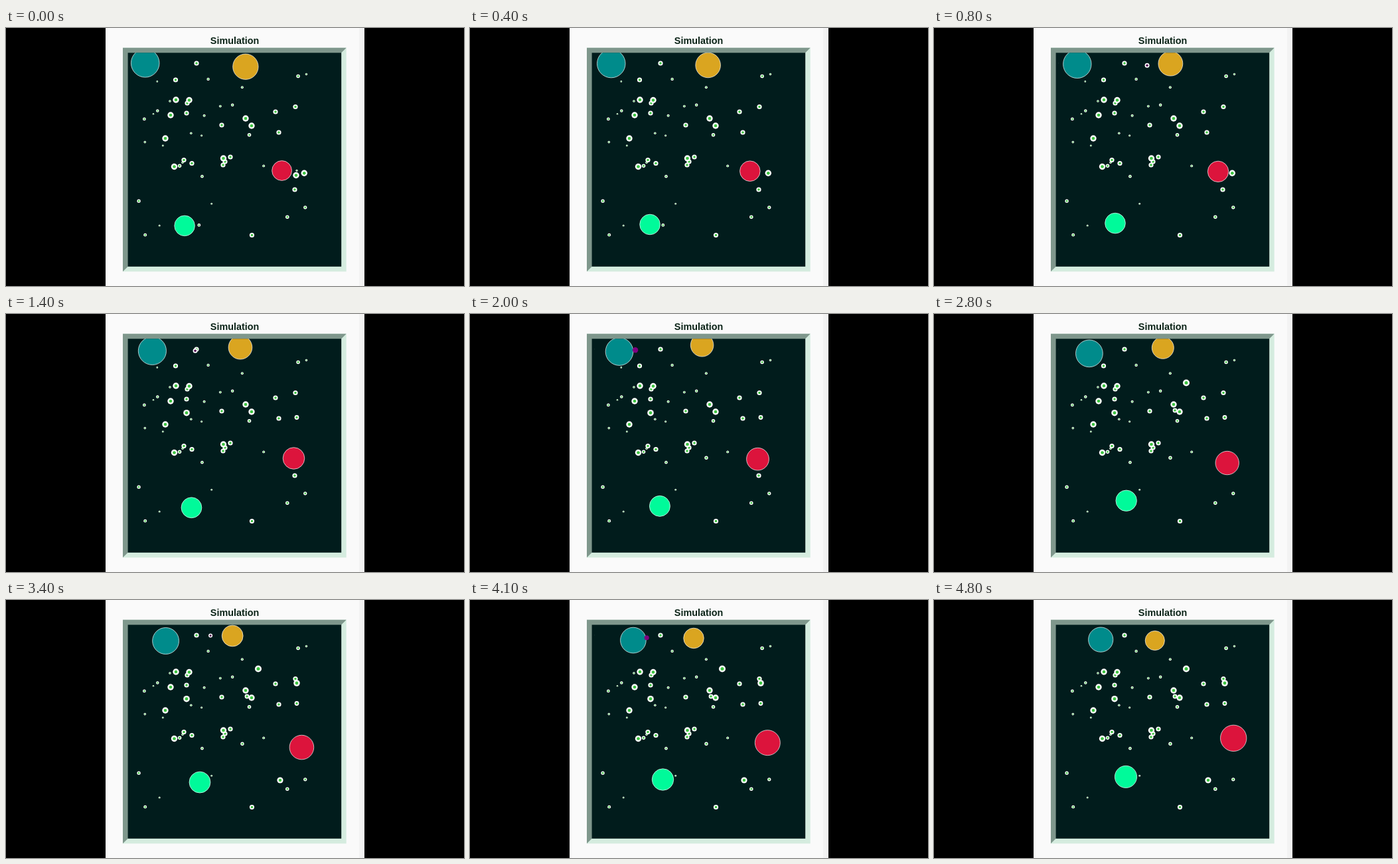
An HTML page for the animation above (4.9 s loop, 690 px wide and 388 px high).

```html
<!DOCTYPE html>
<html lang="en">
<head>
<meta charset="utf-8">
<title>Simulation</title>
<style>
  html, body { margin: 0; width: 100%; height: 100%; overflow: hidden; background: #000; }
  svg { display: block; width: 690px; height: 388px; }
  text { font: bold 14.4px "Liberation Sans", Arial, sans-serif; fill: #0c2418; }
</style>
</head>
<body>
<svg viewBox="0 0 690 388">
  <rect width="690" height="388" fill="#000"/>
  <rect x="150" width="390" height="388" fill="#fafafa"/>
  <rect x="532" width="8" height="388" fill="#f3f3f3"/>
  <text x="344.6" y="23.6" text-anchor="middle">Simulation</text>
  <rect x="176" y="29.7" width="336.7" height="336.6" fill="#d5ecdf"/>
  <path d="M176 29.7H512.7L505.2 37.3L183.6 358.8L176 366.3Z" fill="#7f978c"/>
  <rect x="183.6" y="37.3" width="321.6" height="321.5" fill="#011c1c"/>
  <clipPath id="arena"><rect x="183.6" y="37.3" width="321.6" height="321.5"/></clipPath>
  <g clip-path="url(#arena)">
    <g id="food"></g>
    <g id="shots"></g>
    <g id="cells"></g>
    <g id="bursts"></g>
  </g>
</svg>
<script>
const LOOP = 4900, STEP = 100, LAST = LOOP - STEP;
const SHOT_SPEED = 0.06, SHOT_REACH = 3.5;

// path: time, x, y; radius goes from one value to the other, eased by a power
const teal = { color: "#008b8b", radius: [21.6, 18.9], power: 2,
  path: [[0, 209.7, 52.8], [2000, 225, 56.5], [3400, 240.6, 61.5], [LAST, 251.2, 59.6]] };
const gold = { color: "#daa520", radius: [19.5, 14.9], power: 1,
  path: [[0, 360.9, 58.2], [2000, 349.6, 46.8], [LAST, 332.8, 61]] };
const red = { color: "#dc143c", radius: [15.2, 20], power: 1,
  path: [[0, 415.6, 214.5], [1150, 433.5, 216.5], [2000, 433.5, 218.2], [3000, 443.8, 225.5], [LAST, 451.2, 207.8]] };
const green = { color: "#00fa9a", radius: [15.6, 16.9], power: 2,
  path: [[0, 269.1, 297.4], [800, 273, 293.6], [2100, 287, 288.5], [3400, 292, 274.1], [LAST, 289, 265.9]] };
const cells = [teal, gold, red, green];

// The larger morsels, grouped by size
const large = [[256, 108], [276, 108.5], [361, 136], [370, 147], [327.5, 196], [248, 131], [240, 166],
  [253.5, 208.5], [437, 221.5], [449.3, 218.3]];
const medium = [[287, 53], [273, 113], [272, 128], [325, 146], [406, 126], [436, 118.5], [411, 157],
  [268, 198.5], [280, 203.5], [330, 201], [327, 206], [338, 194], [370.5, 311.5], [435, 243], [255.5, 78]];
// Later arrivals, one after the other: x, y, radius
const arrivals = [[272, 148.7, 4.8], [438, 155.5, 3.4], [356, 216.3, 2.7], [363, 145, 3.4], [380, 103.5, 5],
  [438, 125, 4.8], [413, 271, 4.6]];

const $ = id => document.getElementById(id);
const set = (el, attrs) => { for (const key in attrs) el.setAttribute(key, attrs[key]); };
const show = (el, on) => set(el, { visibility: on ? "visible" : "hidden" });

function add(parent, tag, attrs = {}) {
  const el = document.createElementNS("http://www.w3.org/2000/svg", tag);
  set(el, attrs);
  return parent.appendChild(el);
}

function addDot(parent, x, y, r, core) {
  const g = add(parent, "g");
  add(g, "circle", { cx: x, cy: y, r, fill: "#fff" });
  add(g, "circle", { cx: x, cy: y, r: r * 0.5, fill: core });
  return g;
}

function seeded(seed) {
  return () => (seed = (seed * 16807) % 2147483647) / 2147483647;
}

const mix = (a, b, k) => a + (b - a) * k;

function pose({ path, radius, power }, t) {
  const i = Math.max(1, path.findIndex(p => p[0] >= t));
  const [a, b] = [path[i - 1], path[i]];
  const k = (t - a[0]) / (b[0] - a[0]);
  return { x: mix(a[1], b[1], k), y: mix(a[2], b[2], k), r: mix(...radius, (t / LAST) ** power) };
}

function touches(cell, t, x, y, reach) {
  const p = pose(cell, t);
  return Math.hypot(p.x - x, p.y - y) < p.r + reach;
}

function firstStep(from, test) {
  let t = Math.ceil(from / STEP) * STEP;
  while (t < LOOP && !test(t)) t += STEP;
  return t;
}

// Food lasts until a cell touches it.
function makeFood(x, y, r, from = 0) {
  const to = firstStep(from, t => cells.some(c => touches(c, t, x, y, r)));
  return { el: addDot($("food"), x, y, r, "#3cc440"), from, to };
}

// A shot leaves the gold cell and flies straight at where the teal cell was.
function makeShot(from, r) {
  const a = pose(gold, from), b = pose(teal, from);
  const angle = Math.atan2(b.y - a.y, b.x - a.x);
  const at = t => {
    const d = SHOT_SPEED * (t - from);
    return [a.x + d * Math.cos(angle), a.y + d * Math.sin(angle)];
  };
  const hit = firstStep(from, t => touches(teal, t, ...at(t), SHOT_REACH));
  const el = add($("shots"), "g");
  addDot(el, 0, 0, r, "#500050");
  const burst = add($("bursts"), "circle", { r: r * 1.2, fill: "#800080" });
  return { from, hit, at, el, burst };
}

const random = seeded(29);
const specks = Array.from({ length: 30 }, () =>
  [mix(200, 462, random()), mix(60, 316, random() ** 1.2), mix(1.2, 2.8, random())]);

const food = [
  ...specks.map(s => makeFood(...s)),
  ...medium.map(p => makeFood(...p, 3.6)),
  ...large.map(p => makeFood(...p, 4.7)),
  ...arrivals.map((a, i) => makeFood(...a, 1000 + 400 * i))
];
const shots = [makeShot(150, 3.5), makeShot(2785, 3)];
for (const cell of cells)
  cell.el = add($("cells"), "circle",
    { fill: cell.color, stroke: "#fff", "stroke-width": 0.8, "stroke-opacity": 0.85 });

function render(t) {
  for (const f of food) show(f.el, t >= f.from && t < f.to);
  for (const cell of cells) {
    const { x, y, r } = pose(cell, t);
    set(cell.el, { cx: x, cy: y, r: r - 0.3 });
  }
  for (const s of shots) {
    const [x, y] = s.at(t);
    set(s.el, { transform: `translate(${x} ${y})` });
    set(s.burst, { cx: x, cy: y });
    show(s.el, t >= s.from && t < s.hit);
    show(s.burst, t === s.hit);
  }
}

const begin = performance.now();
function tick() {
  const t = (performance.now() - begin) % LOOP;
  render(Math.floor(t / STEP) * STEP);
  requestAnimationFrame(tick);
}
tick();
</script>
</body>
</html>
```
